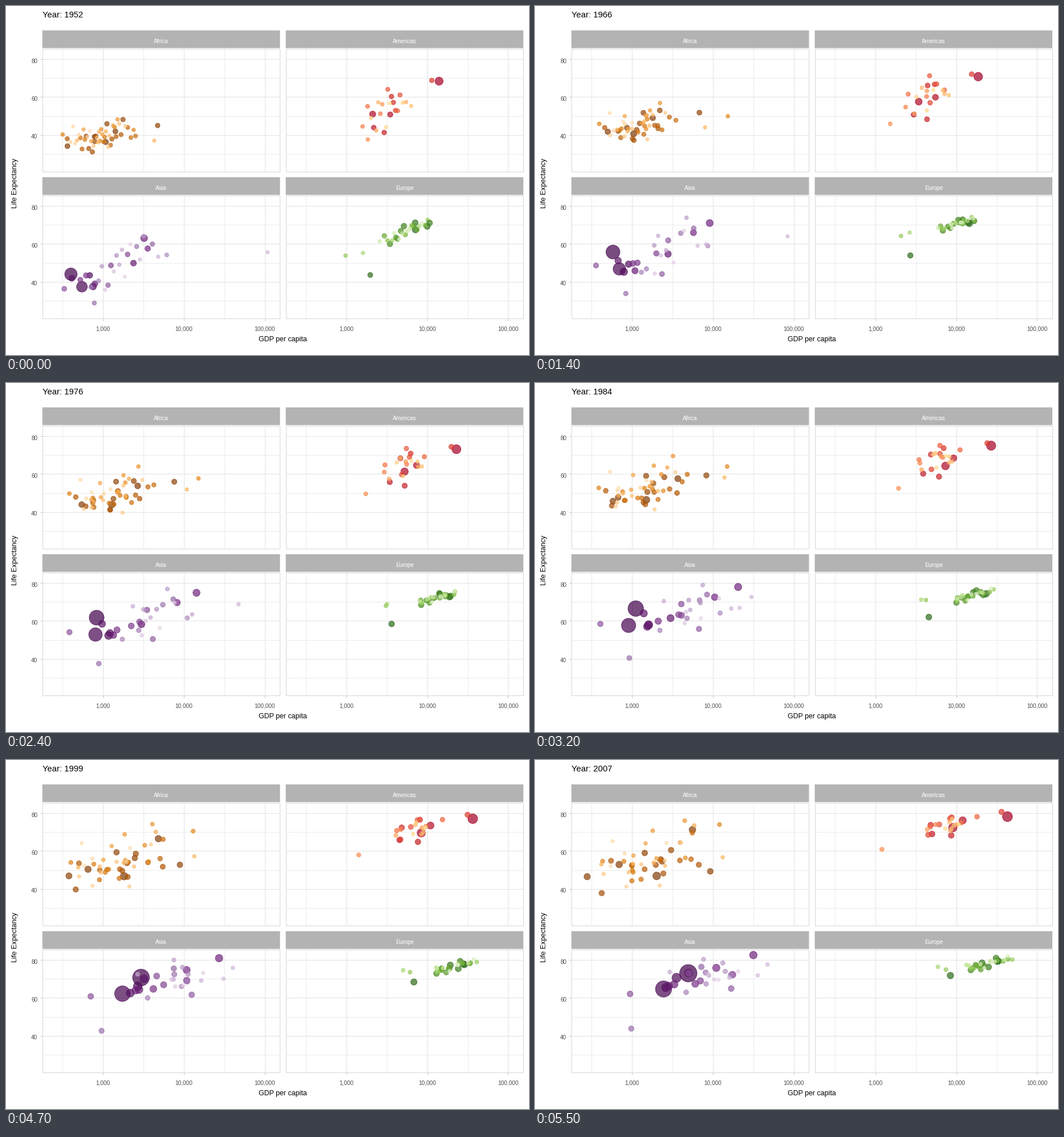
Recreate the animation shown at these times as a matplotlib script. Size 917 by 611 pixels, loop 5600 ms.

```python
import numpy as np
import matplotlib.pyplot as plt
from matplotlib.animation import FuncAnimation
from matplotlib.colors import LinearSegmentedColormap
from matplotlib.patches import Rectangle

W, H, DPI = 917, 611, 64
PT = 72 / DPI  # points per pixel
PANEL_W, PANEL_H = 416.6, 215.3
LEFTS, TOPS = (63.8, 490.5), (74.7, 331.7)
KEYS = [1952, 1966, 1984, 2007]

plt.rcParams["font.family"] = "Liberation Sans"
fig = plt.figure(figsize=(W / DPI, H / DPI), dpi=DPI, facecolor="white")
ax = fig.add_axes([0, 0, 1, 1])
ax.set(xlim=(0, W), ylim=(H, 0))
ax.axis("off")


def to_x(left, log_income):
    return left + (log_income - 2.2487) * PANEL_W / 2.94


def to_y(top, life):
    return top + (85.553 - life) * PANEL_H / 64.904


def line(xs, ys, color, width, z=1):
    ax.plot(xs, ys, color=color, lw=width * PT, zorder=z,
            solid_capstyle="butt")


def label(x, y, text, px, color="black", ha="center", **kw):
    return ax.text(x, y, text, size=px * PT, color=color, ha=ha,
                   va="baseline", **kw)


def at(year, rows):
    """Value of each row at a year, rows being keyed at KEYS."""
    return np.array([np.interp(year, KEYS, row) for row in rows])


def spread(rng, n):
    """Bell-shaped values in random order, evenly spaced by quantile."""
    q = (rng.permutation(n) + 0.5) / n
    return 2 * np.tanh(np.log(q / (1 - q)) / 3.4)


class Cloud:
    """Unnamed dots drifting about a moving centre, tilted by a correlation."""

    def __init__(self, seed, n, income, income_sd, life, life_sd, tilt,
                 pop, growth):
        rng = np.random.default_rng(seed)
        self.base = [spread(rng, n) for _ in range(2)]
        self.drift = [spread(rng, n) for _ in range(2)]
        self.keys = [income, income_sd, life, life_sd]
        self.tilt = tilt
        big, small = pop
        last = big * (small / big) ** (np.linspace(0, 1, n) ** 1.4)
        self.pops = np.column_stack([last / growth, last])

    def place(self, year):
        turn = (year - 1952) / 55
        u, v = [a * np.cos(turn) + b * np.sin(turn)
                for a, b in zip(self.base, self.drift)]
        v = self.tilt * u + np.sqrt(1 - self.tilt ** 2) * v
        income, income_sd, life, life_sd = at(year, self.keys)
        return income + income_sd * u, life + life_sd * v


class Panel:
    """Leads are (first pop, last pop, incomes, lives) of the notable dots."""

    def __init__(self, name, left, top, ramp, leads, cloud):
        self.left, self.top, self.cloud = left, top, cloud
        self.incomes = np.log10([lead[2] for lead in leads])
        self.lives = [lead[3] for lead in leads]
        self.pops = np.vstack([[lead[:2] for lead in leads], cloud.pops])
        self.draw_frame(name)
        # The most populous dot is the darkest.
        rank = np.argsort(np.argsort(-self.pops[:, 1], kind="stable"))
        cmap = LinearSegmentedColormap.from_list(name, ramp)
        colors = cmap(rank / (len(rank) - 1))
        colors[:, 3] = 0.7
        self.dots = ax.scatter(*self.place(1952).T, s=self.sizes(1952),
                               c=colors, edgecolors=colors, lw=PT, zorder=3)

    def draw_frame(self, name):
        x0, y0 = self.left, self.top
        x1, y1 = x0 + PANEL_W, y0 + PANEL_H
        for half in range(5, 11):
            x = to_x(x0, half / 2)
            line([x, x], [y0, y1], "#dedede", 0.6 if half % 2 else 0.85)
        for life in range(30, 81, 10):
            y = to_y(y0, life)
            line([x0, x1], [y, y], "#dedede", 0.6 if life % 20 else 0.85)
        line([x0, x1, x1, x0, x0], [y0, y0, y1, y1, y0], "#d6d6d6", 1, 4)
        ax.add_patch(Rectangle((x0, y0 - 32), PANEL_W, 31, fc="#b3b3b3",
                               lw=0, zorder=5, snap=False))
        label((x0 + x1) / 2, y0 - 9.7, name, 10, "white", zorder=6)

    def place(self, year):
        x, y = self.cloud.place(year)
        x = np.append(at(year, self.incomes), x)
        y = np.append(at(year, self.lives), y)
        return np.column_stack([to_x(self.left, x), to_y(self.top, y)])

    def sizes(self, year):
        k = (year - 1952) / 55
        pop = self.pops[:, 0] * (1 - k) + self.pops[:, 1] * k
        diameter = 5.6 + 24.8 * np.sqrt(pop / self.max_pop)
        return (diameter * PT) ** 2

    max_pop = 1319  # millions

    def show(self, year):
        self.dots.set_offsets(self.place(year))
        self.dots.set_sizes(self.sizes(year))


africa = Panel(
    "Africa", LEFTS[0], TOPS[0],
    ["#7f3b08", "#b35806", "#e08214", "#fdb863", "#fee0b6"],
    [(33, 135, [1077, 1045, 1500, 2014], [36.3, 40.6, 46.4, 46.9]),
     (22, 80, [1419, 1800, 3680, 5581], [41.9, 49, 57.6, 71.3]),
     (21, 76, [362, 500, 580, 691], [34.1, 41.7, 45.7, 52.9]),
     (14, 65, [781, 865, 672, 278], [39.1, 43.8, 47.7, 46.5]),
     (14, 44, [4725, 6800, 8300, 9270], [45, 51.8, 59.3, 49.3]),
     (1, 6, [2388, 15300, 15000, 12057], [42.7, 49.9, 64, 74]),
     (0.4, 1.5, [4293, 8000, 13900, 13206], [37, 44, 58.2, 56.7])],
    Cloud(4, 45, income=[2.95, 3.07, 3.14, 3.2],
          income_sd=[0.26, 0.26, 0.31, 0.39], life=[39.5, 45.3, 52.5, 55.3],
          life_sd=[5, 5.6, 7.5, 9.5], tilt=0.45, pop=(42, 0.2), growth=3))

americas = Panel(
    "Americas", LEFTS[1], TOPS[0],
    ["#a50026", "#d73027", "#f46d43", "#fdae61", "#fee090"],
    [(158, 301, [13990, 18700, 27000, 42952], [68.4, 70.8, 75, 78.2]),
     (57, 190, [2109, 3430, 7350, 9066], [51, 57.6, 64.3, 72.4]),
     (30, 109, [3478, 5520, 9250, 11978], [50.8, 59.9, 68.4, 76.2]),
     (15, 33, [11367, 15500, 24200, 36319], [68.8, 72.1, 76.3, 80.7]),
     (3, 8.5, [1840, 1520, 1930, 1202], [37.6, 45.9, 52.5, 60.9])],
    Cloud(7, 20, income=[3.5, 3.65, 3.77, 3.88],
          income_sd=[0.19, 0.19, 0.19, 0.22], life=[53, 60.5, 67.7, 73.4],
          life_sd=[8.5, 7.7, 5.3, 3.2], tilt=0.6, pop=(44, 1), growth=2.6))

asia = Panel(
    "Asia", LEFTS[0], TOPS[1],
    ["#40004b", "#762a83", "#9970ab", "#c2a5cf", "#e7d4e8"],
    [(556, 1319, [400, 580, 1110, 4959], [44, 55.7, 66.5, 73]),
     (372, 1110, [547, 695, 905, 2452], [37.4, 46.8, 57.6, 64.7]),
     (82, 224, [750, 790, 1600, 3541], [37.5, 45.3, 57.9, 70.6]),
     (86, 127, [3217, 9120, 20500, 31656], [63, 71, 77.9, 82.6]),
     (41, 169, [685, 905, 1540, 2606], [43.4, 49.3, 57, 65.5]),
     (20, 48, [331, 358, 405, 944], [36.3, 48.6, 58.4, 62.1]),
     (8, 32, [779, 836, 925, 975], [28.8, 33.8, 40.4, 43.8]),
     (0.2, 2.5, [108382, 84000, 30000, 47307], [55.6, 64, 72.6, 77.6])],
    Cloud(11, 25, income=[3.2, 3.42, 3.72, 3.95],
          income_sd=[0.36, 0.4, 0.5, 0.45], life=[49, 56.5, 65.5, 71.5],
          life_sd=[8.5, 9, 7, 5.5], tilt=0.65, pop=(150, 0.7), growth=3))

europe = Panel(
    "Europe", LEFTS[1], TOPS[1],
    ["#276419", "#4d9221", "#7fbc41", "#b8e186", "#e6f5d0"],
    [(22, 71, [1969, 2700, 4570, 8458], [43.6, 53.9, 62, 71.8]),
     (69, 82, [7144, 14500, 23300, 32170], [67.5, 70.8, 74.3, 79.4]),
     (50, 61, [9980, 14000, 20000, 33203], [69.2, 71.3, 75, 79.4]),
     (1.3, 3.6, [1601, 2650, 3680, 5937], [55.2, 66, 71.2, 76.4]),
     (2.8, 4.6, [974, 2070, 4220, 7446], [53.8, 64.2, 71, 74.9]),
     (3.3, 4.6, [10095, 15500, 29000, 49357], [72.7, 74.1, 76.6, 80.2])],
    Cloud(5, 24, income=[3.72, 4.0, 4.18, 4.36],
          income_sd=[0.19, 0.16, 0.17, 0.2], life=[66.3, 70.5, 73.3, 77.8],
          life_sd=[3.8, 2, 2.2, 2.4], tilt=0.85, pop=(61, 0.3), growth=1.25))

panels = [africa, americas, asia, europe]

for top in TOPS:
    for life in (40, 60, 80):
        y = to_y(top, life)
        line([LEFTS[0] - 3.5, LEFTS[0]], [y, y], "#b3b3b3", 0.8)
        label(55.3, y + 6.5, str(life), 10, "#4d4d4d", "right")
for left in LEFTS:
    for power in (3, 4, 5):
        x, y = to_x(left, power), TOPS[1] + PANEL_H
        line([x, x], [y, y + 3.5], "#b3b3b3", 0.8)
        label(x, 568.8, f"{10 ** power:,}", 10, "#4d4d4d")
label(485.5, 587.3, "GDP per capita", 12.4)
label(19, 310, "Life Expectancy", 12.4, rotation=90, rotation_mode="anchor")
title = label(63.8, 20, "Year: 1952", 14.8, ha="left")


def update(i):
    year = 1952 + i
    title.set_text(f"Year: {year}")
    for panel in panels:
        panel.show(year)
    return [title] + [panel.dots for panel in panels]


anim = FuncAnimation(fig, update, frames=56, interval=100, repeat=True,
                     repeat_delay=0, blit=False)
plt.show()
```
